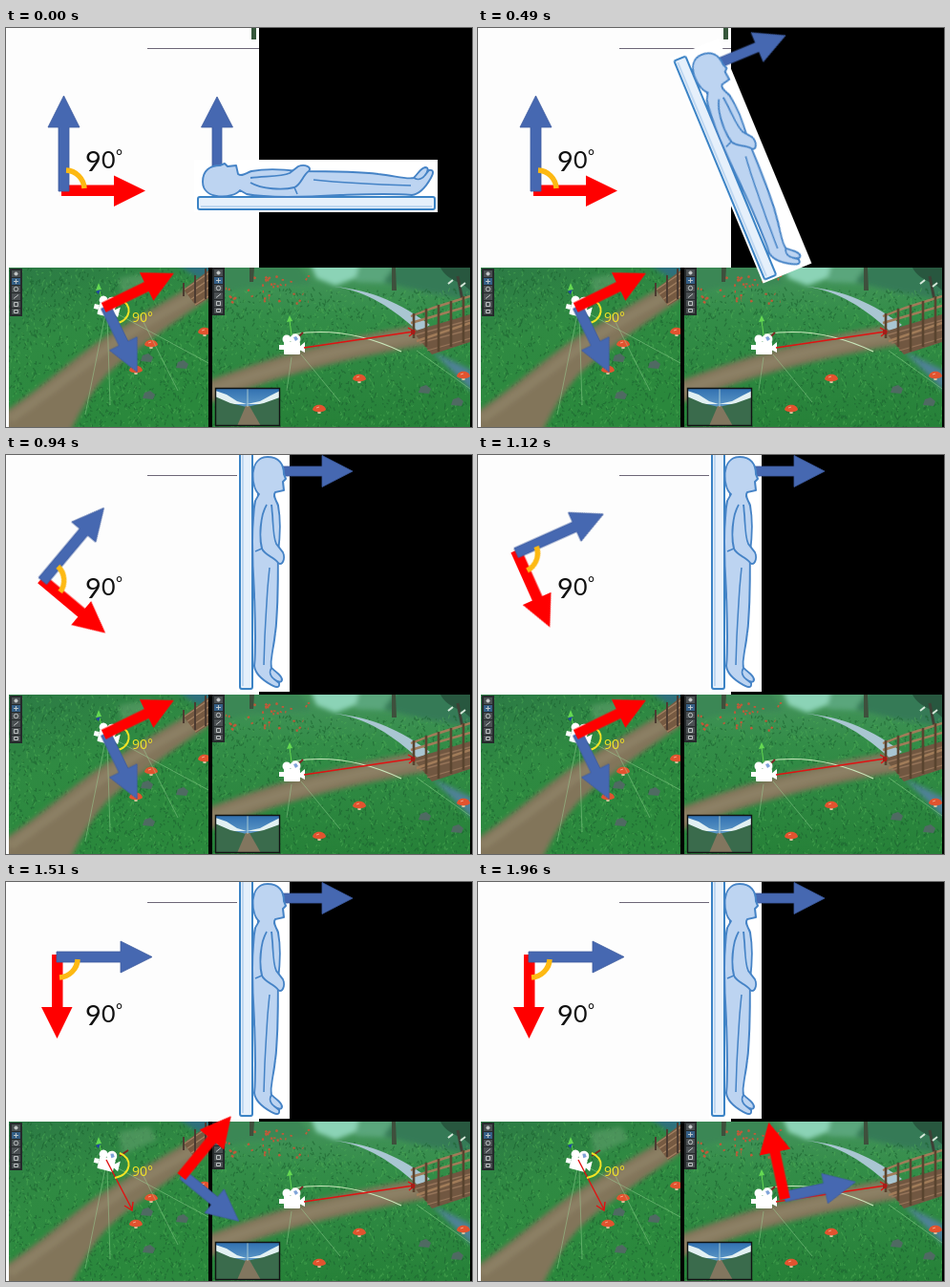
Recreate the animation shown at these times as an HTML page. Size 488 by 418 pixels, loop 2110 ms.

```html
<!DOCTYPE html>
<html lang="en">
<head>
<meta charset="utf-8">
<title>Rotating axes</title>
<style>
  html, body { margin: 0; width: 100%; height: 100%; overflow: hidden; background: #fff; }
  svg { display: block; position: absolute; left: 0; top: 0; }
  .body, .axes, .pair { animation: 2110ms infinite; }
  .body { animation-name: stand; transform-origin: 319.5px 115.5px; }
  .axes { animation-name: turn; transform-origin: 103px 121px; }
  .pair { animation-name: carry; transform-origin: 0 0; }
  .blue { fill: #4668b1; stroke: #3d5b9f; stroke-width: .8; }
  .red { fill: #f00; }
  .soft { filter: url(#soft); }
  .figure { fill: #bdd4f1; stroke: #4583c6; stroke-width: 1.9; stroke-linejoin: round; }
  .ray { fill: none; stroke: #9fdc9c; stroke-width: .8; opacity: .55; }
  .aim { fill: none; stroke: #e01212; stroke-width: 1.4; }
  .dark { fill: none; stroke: #1b6130; stroke-width: 1.2; opacity: .6; }
  .light { fill: none; stroke: #4fae55; stroke-width: 1.1; opacity: .5; }

  @keyframes stand {
    0% { transform: rotate(0deg); animation-timing-function: steps(1, end); }
    1.4218% { transform: rotate(6deg); animation-timing-function: steps(20, end); }
    30.3318% { transform: rotate(88deg); animation-timing-function: steps(1, end); }
    31.7536%, 100% { transform: rotate(90deg); }
  }
  @keyframes turn {
    0% { transform: rotate(0deg); animation-timing-function: steps(1, end); }
    31.7536% { transform: rotate(1deg); animation-timing-function: steps(20, end); }
    60.1896% { transform: rotate(87.6deg); animation-timing-function: steps(1, end); }
    61.6114%, 100% { transform: rotate(90deg); }
  }
  @keyframes carry {
    0%, 61.6114% { transform: translate(104px, 292px) rotate(-26deg); animation-timing-function: steps(7, end); }
    71.564% { transform: translate(185px, 307px) rotate(-50.6deg); animation-timing-function: steps(15, end); }
    92.891%, 100% { transform: translate(321px, 330px) rotate(-102deg); }
  }
</style>
</head>
<body>
<svg width="488" height="418" viewBox="0 0 488 418">
  <defs>
    <filter id="soft" x="-20%" y="-20%" width="140%" height="140%"><feGaussianBlur stdDeviation="2.4"/></filter>
    <linearGradient id="lawn" x1="0" y1="0" x2=".4" y2="1">
      <stop offset="0" stop-color="#2c7a45"/><stop offset=".45" stop-color="#2f8a42"/><stop offset="1" stop-color="#2a883c"/>
    </linearGradient>
    <linearGradient id="hill" x1="0" y1="0" x2="0" y2="1">
      <stop offset="0" stop-color="#45935c"/><stop offset=".3" stop-color="#338d48"/><stop offset="1" stop-color="#268138"/>
    </linearGradient>
    <linearGradient id="sky" x1="0" y1="0" x2="0" y2="1">
      <stop offset="0" stop-color="#2f6fb0"/><stop offset="1" stop-color="#8fc3de"/>
    </linearGradient>
    <clipPath id="leftClip"><path d="M3 251H212V418H3z"/></clipPath>
    <clipPath id="rightClip"><path d="M216 251H486V418H216z"/></clipPath>
    <clipPath id="insetClip"><path d="M220 378H286V416H220z"/></clipPath>
    <g id="mushroom">
      <path d="M-2 0H2L1.5 5H-1.5z" fill="#d9c4a0"/>
      <path d="M-7 1C-6-6 6-6 7 1C4 4-4 4-7 1z" fill="#e2532f"/>
      <path d="M-3-1L0-2" stroke="#f5a183"/>
    </g>
    <path id="rock" d="M-6 3L-4-3L2-5L7-1L5 4z" fill="#4f6a62"/>
    <g id="camera">
      <g fill="#fff">
        <circle cx="-5" cy="-8" r="4.5"/><circle cx="4" cy="-8" r="5.5"/>
        <rect x="-8" y="-5" width="17" height="13" rx="1"/>
        <path d="M8 0L14-5V6L8 3zM-8-2H-13V3H-8z"/>
      </g>
      <path d="M2-10L5-11L7-8L4-6z" fill="#7fa3d8"/>
    </g>
    <g id="tools">
      <rect width="13" height="50" fill="#25292b"/>
      <path d="M2 2H11V9H2zM2 18H11V25H2zM2 26H11V33H2zM2 34H11V41H2zM2 42H11V48H2z" fill="#4a4f52"/>
      <path d="M2 10H11V17H2z" fill="#355f86"/>
      <g fill="none" stroke="#c8cccc" stroke-width=".9">
        <circle cx="6.5" cy="5.5" r="1.6" fill="#c8cccc"/><path d="M6.5 11V16M4 13.5H9"/>
        <circle cx="6.5" cy="21.5" r="2.2"/><path d="M4 31.5L9 27.5M4.5 35.5H8.5V39.5H4.5zM4.5 43.5H8.5V46.5H4.5z"/>
      </g>
    </g>
  </defs>

  <!-- slide -->
  <path d="M0 0H488V418H0z" fill="#000"/>
  <path d="M0 0H265V251H3V418H0z" fill="#fdfdfd"/>
  <path d="M257 0H262V12H257z" fill="#36573b"/>
  <path d="M148 21.5H265" stroke="#6c6676"/>

  <!-- view from above -->
  <g clip-path="url(#leftClip)">
    <path d="M3 251H212V418H3z" fill="url(#lawn)"/>
    <path id="grassLeftDark" class="dark"/>
    <path id="grassLeftLight" class="light"/>
    <g class="soft">
      <path d="M118 262L150 256L158 270L122 286z" fill="#579a66" opacity=".7"/>
      <path d="M176 245H220V268L198 260z" fill="#2d6f7b"/>
      <path d="M-6 405C40 376 75 341 110 320C150 295 175 282 195 269L220 278C182 305 142 331 112 357C96 371 80 396 66 426H-6z" fill="#82755a"/>
      <path d="M4 410C50 378 92 345 118 327C150 306 180 291 205 276" fill="none" stroke="#8c8065" stroke-width="9"/>
    </g>
    <path d="M186 274L212 254V283L199 291z" fill="#765a42"/>
    <path d="M187 274L212 257M190 279L212 264M194 284L212 272M198 290L212 281" stroke="#a28162" stroke-width="1.4"/>
    <path d="M186 267V281M198 259V288M209 252V284" stroke="#4c3b31" stroke-width="2"/>
    <use href="#mushroom" x="152" y="331"/><use href="#mushroom" x="136" y="358"/><use href="#mushroom" x="208" y="318"/>
    <use href="#rock" x="149" y="385"/><use href="#rock" x="147" y="346"/><use href="#rock" x="184" y="353"/>
    <path class="ray" d="M104 300L83 405M106 300L109 395M112 297L212 351M140 300L180 380"/>
    <path d="M100 284L97 270" stroke="#57d34b"/><path d="M94 275L97 267L100 274z" fill="#65d952"/>
    <path d="M94 276L99 274L97 279z" fill="#2148a0"/>
    <path d="M119 287L128 281" stroke="#7d2924" stroke-width="2"/>
    <use href="#camera" transform="translate(105 294) rotate(14)"/>
    <path class="aim" d="M105 291L132 343M124 339L132 344L133 335"/>
    <path d="M119 284C133 289 132 306 114 310" fill="none" stroke="#f4e425" stroke-width="2"/>
    <text x="132" y="308" font-family="'Open Sans', 'Noto Sans', sans-serif" font-size="14" fill="#f4e425">90°</text>
    <use href="#tools" x="4" y="252"/>
  </g>

  <!-- view across the meadow -->
  <g clip-path="url(#rightClip)">
    <path d="M216 251H486V418H216z" fill="url(#hill)"/>
    <g class="soft">
      <path d="M318 245H372L366 262L345 270L325 262z" fill="#8bd3b6"/>
      <path d="M370 245H430L412 268L366 266z" fill="#5aa67c"/>
      <path d="M216 245H305L320 268L250 272L216 282z" fill="#3b8755"/>
      <path d="M410 245H490V285L440 277L395 266z" fill="#357a56"/>
    </g>
    <path id="grassRightDark" class="dark"/>
    <path id="grassRightLight" class="light"/>
    <path id="flowers" fill="none" stroke="#c05a38" stroke-width="2.4"/>
    <g class="soft">
      <path d="M445 338L490 360V382L460 352z" fill="#4f8199"/>
      <path d="M205 384C262 362 325 340 440 321" fill="none" stroke="#82755a" stroke-width="22"/>
      <path d="M212 381C268 360 340 337 430 322" fill="none" stroke="#8c8065" stroke-width="10"/>
    </g>
    <path d="M344 271C372 275 396 286 432 318L444 311C414 289 385 275 344 271z" fill="#a9c6d2"/>
    <path d="M255 251H260L259 266H255zM404 251H408L409 275H404z" fill="#3e4f3c"/>
    <path d="M455 251H486V275C478 265 463 266 455 251z" fill="#28573f"/>
    <path d="M473 260L478 285" stroke="#3e4036" stroke-width="3"/>
    <path d="M463 268L468 264M476 271L481 267" stroke="#d5e7d9" stroke-width="2"/>
    <path d="M426 318L486 300V329L446 342z" fill="#715741"/>
    <path d="M427 322L486 306M433 330L486 316M441 338L486 325" stroke="#957459" stroke-width="1.3"/>
    <path d="M424 302L448 293L486 281M424 309L486 291M430 328L486 309" fill="none" stroke="#a17c59" stroke-width="2.4"/>
    <path d="M427 299V325M440 294V334M453 290V339M466 286V334M479 281V330" stroke="#59442f" stroke-width="2.6"/>
    <use href="#mushroom" x="370" y="367"/><use href="#mushroom" x="328" y="399"/><use href="#mushroom" x="479" y="364"/>
    <use href="#rock" x="438" y="379"/><use href="#rock" x="472" y="392"/>
    <path class="ray" d="M299 345L294 380M309 342L350 392M430 338L486 378"/>
    <path d="M300 321C335 315 372 319 414 339" fill="none" stroke="#cbeabd" stroke-width="1.2"/>
    <path d="M299 322L297 306" stroke="#65d952"/><path d="M294 308L297 301L300 307z" fill="#65d952"/>
    <path d="M305 325L311 319" stroke="#7d2924" stroke-width="2"/>
    <use href="#camera" x="299" y="334"/>
    <path class="aim" d="M312 335L427 318M421 314L428 318L422 323"/>
    <path d="M424 316H428V321H424z" fill="#a71c17"/>
    <g clip-path="url(#insetClip)">
      <path d="M219 377H287V417H219z" fill="url(#sky)"/>
      <path d="M219 380L231 384L242 391L252 394L266 391L277 385L287 380V394H219z" fill="#e2f0f2"/>
      <path d="M219 386L235 393L252 397L270 393L287 387V417H219z" fill="#3a6b4c"/>
      <path d="M251 396H255L267 417H242z" fill="#82765f"/>
      <path d="M253 378V397" stroke="#d3e8dd" stroke-width=".7"/>
    </g>
    <path d="M219.5 377.5H286.5V416.5H219.5z" fill="none" stroke="#101313" stroke-width="1.4"/>
    <use href="#tools" x="216" y="251"/>
  </g>

  <!-- diagram -->
  <g class="axes">
    <path class="red" d="M58 164.5H113V154.5L146 170.5L113 187V176H58z"/>
    <path class="blue" d="M55 171V104H44L60.5 71L77 104H66V171z"/>
    <path d="M63 149A20 20 0 0 1 82 168" fill="none" stroke="#fdb913" stroke-width="5.5"/>
  </g>
  <g font-family="Lato, 'Open Sans', sans-serif" fill="#111">
    <text x="83" y="150" font-size="29">9</text>
    <text x="100" y="146.500" font-size="25">0</text>
    <text x="115" y="140" font-size="17">°</text>
  </g>

  <!-- patient on the board -->
  <g class="body">
    <path d="M197 138H452V193H197z" fill="#fff"/>
    <rect x="201" y="177" width="248" height="13" rx="2" fill="#e6f0fb" stroke="#3b83c5" stroke-width="2"/>
    <path d="M204 187H446" stroke="#c0d8f1" stroke-width="2"/>
    <path class="blue" d="M216 147V104H204.500L221 72L237.500 104H226V147z"/>
    <path class="figure" d="M245 170C238 179 206 181 206 161C206 149 214 144 224 144L229 142L232 145L241 144L243 153C247 156 251 152 257 150C273 147 290 148 306 150C330 150 368 150 390 153C408 155 420 159 427 157C432 152 434 147 439 146C443 146 442 150 439 154L443 149C448 148 448 152 445 157C440 166 434 174 425 175C402 173 380 174 350 175C315 177 272 178 252 174z"/>
    <path class="figure" d="M256 157C272 155 288 156 297 152L306 145C313 142 321 146 317 150C311 154 309 164 302 167C290 170 268 169 256 162"/>
    <path d="M302 167L305 174M322 159C350 162 390 164 424 165M427 157C432 160 436 158 439 154" fill="none" stroke="#4583c6" stroke-width="1.6"/>
  </g>

  <!-- travelling axes -->
  <g class="pair">
    <path class="blue" d="M-5 0V43H-16L0 76L16 43H5.500V0z"/>
    <path class="red" d="M-2-5.500H48V-16.500L80 0L48 16.500V5.500H-2z"/>
  </g>
</svg>
<script>
  let seed = 17;
  const rand = () => (seed = (seed * 16807) % 2147483647) / 2147483647;

  // Scatter short blades over a box.
  function scatter(id, count, x, y, w, h, dx, dy) {
    let d = '';
    for (let i = 0; i < count; i++) {
      const px = x + rand() * w, py = y + rand() * h;
      d += `M${px.toFixed(1)} ${py.toFixed(1)}l${(dx * (rand() - .5)).toFixed(1)} ${(-dy * rand()).toFixed(1)}`;
    }
    document.getElementById(id).setAttribute('d', d);
  }
  scatter('grassLeftDark', 1100, 3, 254, 209, 166, 5, 4);
  scatter('grassLeftLight', 700, 3, 254, 209, 166, 5, 4);
  scatter('grassRightDark', 1200, 216, 275, 270, 145, 5, 4);
  scatter('grassRightLight', 800, 216, 275, 270, 145, 5, 4);
  scatter('flowers', 40, 228, 260, 90, 30, 5, 2);
</script>
</body>
</html>
```
